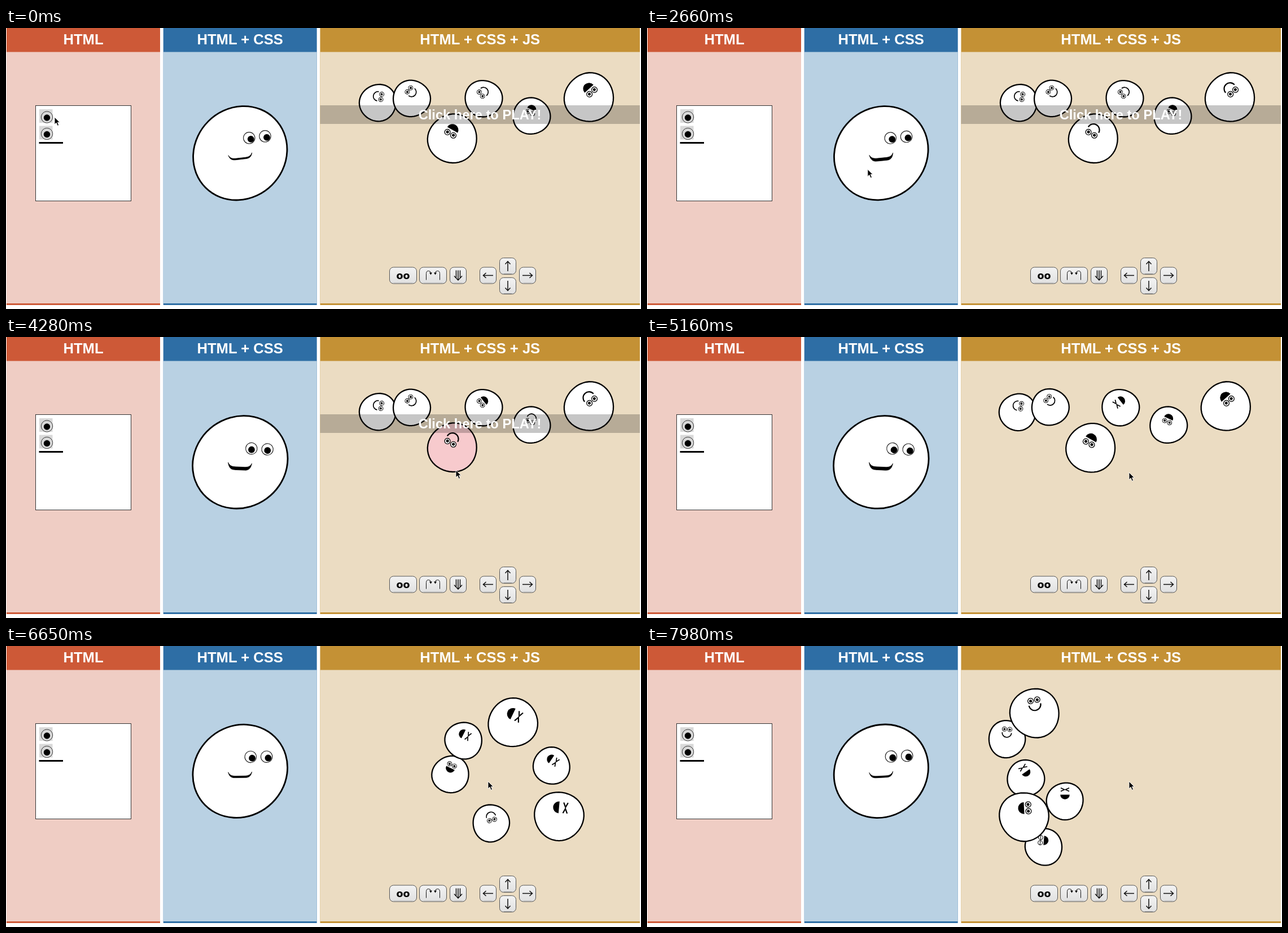
An HTML page that plays this animation: 1125x498 px, repeating every 8 s.

```html
<!DOCTYPE html>
<html lang="en">
<head>
<meta charset="utf-8">
<title>HTML, CSS and JS faces</title>
<style>
  html, body { margin: 0; width: 100%; height: 100%; overflow: hidden; background: #fff; }
  svg { display: block; width: 100%; height: 100%; }
  text { font-family: "Liberation Sans", Arial, sans-serif; font-weight: bold; text-anchor: middle; }
  .title { font-size: 25.6px; fill: #fff; }
  .label { font: bold 17.5px "DejaVu Sans", sans-serif; }
  .icon { fill: none; stroke: #111; stroke-width: 1.5; }
  .ball { stroke: #000; stroke-width: 2.3; }
  .line { fill: none; stroke: #000; stroke-width: 1.7; }
  .eye { fill: #fff; stroke: #000; stroke-width: 1; }
</style>
</head>
<body>
<svg viewBox="0 0 1125 498">
  <defs>
    <linearGradient id="keyFace" x2="0" y2="1">
      <stop stop-color="#f3f3f3"/><stop offset="1" stop-color="#e0e0e0"/>
    </linearGradient>
    <g id="plainEye">
      <rect x="-13.5" y="-14" width="23.5" height="24" fill="#d9d9d9"/>
      <circle r="10.2" fill="none" stroke="#333"/>
      <circle cy="1" r="5.7"/>
    </g>
    <path id="arrowPointer" d="M0 0V13L3 10L5.3 15.3L7.6 14.3L5.4 9.2H9.2Z" stroke="#fff" stroke-width=".9"/>
    <path id="textPointer" d="M-3-6.5Q0-6.5 0-4.5Q0-6.5 3-6.5M0-4.5V4.5M-3 6.5Q0 6.5 0 4.5Q0 6.5 3 6.5M-1.5 2H1.5"
      fill="none" stroke="#000" stroke-width="1.3"/>
  </defs>
  <g id="panels"></g>
  <rect x="52.5" y="137.5" width="169" height="169" fill="#fff" stroke="#333"/>
  <use href="#plainEye" x="72.5" y="158"/>
  <use href="#plainEye" x="72.5" y="187.5"/>
  <rect x="58.5" y="202" width="42.5" height="3"/>
  <g id="head"></g>
  <g id="balls"></g>
  <g id="overlay">
    <rect x="556.5" y="137" width="566.5" height="33" fill="#000" fill-opacity=".225"/>
    <text x="839.5" y="161.5" font-size="23.7" fill="#fff">Click here to PLAY!</text>
  </g>
  <g id="keys"></g>
  <use id="pointer"/>
</svg>
<script>
const STEP = 147.5, LOOP = 8000;
const PLAY_STEP = 31, SWEEP_STEP = 33;
const byId = id => document.getElementById(id);
const put = (id, markup) => { byId(id).innerHTML = markup; };

/* Static parts */
const panel = (x, width, dark, light, title) => `
  <rect x="${x}" width="${width}" height="491" fill="${dark}"/>
  <rect x="${x}" y="42.5" width="${width}" height="445.5" fill="${light}"/>
  <text class="title" x="${x + width / 2}" y="29.3">${title}</text>`;

put('panels',
  panel(1, 272, '#cd5937', '#efcdc4', 'HTML') +
  panel(278.7, 272, '#2e6ea5', '#b9d1e3', 'HTML + CSS') +
  panel(556.5, 566.5, '#c49135', '#ebdcc2', 'HTML + CSS + JS'));

const key = (x, y, width, content) => `
  <g transform="translate(${x} ${y})">
    <rect x="${-width / 2}" y="-14.5" width="${width}" height="29" rx="7" fill="url(#keyFace)" stroke="#555"/>
    <path d="M${7 - width / 2} 13.5H${width / 2 - 7}" stroke="#aaa"/>
    ${content}
  </g>`;
const arrow = turn =>
  `<path class="icon" transform="rotate(${turn})" d="M0 9V-8M-4.5-3.5L0-8.5L4.5-3.5"/>`;
const brow = flip => `<g transform="scale(${flip} 1)">
  <path class="icon" style="stroke-width:1" d="M-12 8V-3Q-12-8-8-8Q-4-8-4-4"/>
  <path d="M-6.5-5H-1.5L-4-1Z"/></g>`;

put('keys',
  key(703.5, 438.5, 48, '<text class="label" y="6.5">oo</text>') +
  key(756.5, 438.5, 48, brow(1) + brow(-1)) +
  key(801, 438.5, 29, '<path class="icon" d="M-3.5-9V4M0-9V8M3.5-9V4M-7 1L0 8.5L7 1"/>') +
  key(854, 438.5, 29, arrow(-90)) +
  key(889, 422, 29, arrow(0)) +
  key(889, 457, 29, arrow(180)) +
  key(924, 438.5, 29, arrow(90)));

/* Motion: key points of [step, ...values] */
const linear = p => p;
const smooth = p => p * p * (3 - 2 * p);

function track(points, step, ease = linear) {
  const i = points.findIndex(point => point[0] > step);
  if (i < 0) return points.at(-1).slice(1);
  const [start, ...from] = points[i - 1];
  const [end, ...to] = points[i];
  const p = ease((step - start) / (end - start));
  return from.map((value, k) => value + (to[k] - value) * p);
}

const pointerPath = [[0, 86, 158], [4, 43, 330], [10, 328, 3], [11, 327, 8],
  [19, 400, 285], [25, 764, 16], [29, 797, 236], [31, 854, 240]];

/* turn, mouth depth */
const headPath = [[0, 0, 9.5], [11, 2.5, 12], [25, -.5, 12], [29, 9, 12.5],
  [40, 9.5, 12.5], [50, 1.5, 7.8], [54, 3.5, 10]];

/* A sweep to the left stops at the wall, where balls pile up and squeeze apart. */
function sweepLeft([x, y, turn], index) {
  const wall = 620 + 22 * index;
  const squeeze = x - 130 < wall ? 12 * (-1) ** index : 0;
  return [Math.max(x - 130, wall), y + squeeze, turn];
}

/* Poses are x, y and face turn; the mouth opens and closes at the toggle steps. */
function makeBall(index, size, toggles, start, right, end) {
  const [x, y, turn] = right;
  return {
    index, size, toggles,
    path: [[0, ...start], [SWEEP_STEP, ...start], [40, ...sweepLeft(start, index)],
      [47, x + 17, y + 8, turn], [50, ...right], [54, ...end]]
  };
}

const balls = [
  makeBall(0, 1, [51], [659, 132.5, 100], [901.5, 348, 180], [703, 356, 275]),
  makeBall(1, 1, [9, 14, 44], [718.5, 125, -50], [806.5, 248, 45], [671, 234.5, -35]),
  makeBall(2, 1, [20], [846, 125, -128], [1011.5, 226, -263], [740.5, 275, -360]),
  makeBall(3, 1, [0, 27, 34, 51], [931, 156, 204], [796, 162.5, 95], [637.5, 165, 5]),
  makeBall(4, 1.33, [0, 8, 22, 27, 34, 46, 51], [791, 196, 209], [1030, 316.5, 67], [668, 302.5, 87]),
  makeBall(5, 1.33, [0, 6, 34, 51], [1033, 123, 138], [880, 131, 110], [687, 119, -12])
];

/* Drawing */
function blob(radius, phase) {
  const points = Array.from({ length: 48 }, (_, i) => {
    const a = i * Math.PI / 24;
    const r = radius * (1 + .012 * Math.cos(2 * a + phase) + .018 * Math.cos(3 * a - 2 * phase));
    return `${(r * Math.cos(a)).toFixed(2)} ${(r * Math.sin(a)).toFixed(2)}`;
  });
  return `M${points.join('L')}Z`;
}

function face(laughing, squinting, blinking) {
  const eye = x => `<circle class="eye" cx="${x}" cy="-6" r="3.9"/>` + (blinking
    ? `<path class="eye" d="M${x - 4}-6h8"/>`
    : `<circle cx="${x}" cy="-5.8" r="2"/>`);
  const eyes = squinting
    ? '<path class="line" d="M-7.5-12L-1-9L-7.5-6M7.5-12L1-9L7.5-6"/>'
    : eye(-4.7) + eye(4.7);
  const mouth = `<path class="${laughing ? '' : 'line'}" d="M-8.3 0A8.3 8.3 0 0 0 8.3 0"/>`;
  return eyes + mouth;
}

function drawBall({ index, size, toggles, path }, step) {
  const [x, y, turn] = track(path, step, step < 50 ? smooth : linear);
  const [px, py] = track(pointerPath, step);
  const hovered = step < PLAY_STEP && Math.hypot(px - x, py - y) < 32.6 * size;

  const past = toggles.filter(from => from <= step);
  const laughing = past.length % 2 === 1;
  const squinting = laughing && step > SWEEP_STEP && step - past.at(-1) > 3;
  const blinking = (step + 15 * index) % 31 === 23;

  return `<g transform="translate(${x} ${y})">
    <path class="ball" fill="${hovered ? '#f7cacd' : '#fff'}" d="${blob(32.6 * size, index + turn / 57)}"/>
    <g transform="translate(0 ${-11.5 * size}) rotate(${turn}) scale(${size > 1 ? 1.27 : 1})">
      ${face(laughing, squinting, blinking)}
    </g>
  </g>`;
}

function drawHead(step) {
  const [turn, depth] = track(headPath, step);
  const look = step >= 25 && step < PLAY_STEP ? .5 : 3;
  const eye = (x, y) => `<circle cx="${x}" cy="${y}" r="10.2" fill="#fff" stroke="#222" stroke-width="1.1"/>
    <circle cx="${x + look}" cy="${y + 2}" r="5.9"/>`;
  return `<g transform="translate(414.8 221.8) rotate(${turn})">
    <ellipse rx="86.5" ry="79.8" transform="rotate(-45)" fill="#fff" stroke="#000" stroke-width="2.8"/>
    ${eye(16, -27)}${eye(44.2, -30)}
    <path transform="translate(0 1.5) rotate(-6.5)" stroke="#000" stroke-width=".7"
      d="M-21 0C-18 6-14 7-7 7H7C14 7 18 6 21 0C19 ${depth} 12 ${depth} 8 ${depth}H-8C-12 ${depth}-19 ${depth}-21 0Z"/>
  </g>`;
}

function placePointer(step) {
  const [x, y] = track(pointerPath, step);
  const overTitle = y < 42 && x > 734 && x < 945;
  const pointer = byId('pointer');
  pointer.setAttribute('href', overTitle ? '#textPointer' : '#arrowPointer');
  pointer.setAttribute('transform', `translate(${x} ${y})`);
}

let shown = -1;
function render(now) {
  const step = Math.floor(now % LOOP / STEP);
  if (step !== shown) {
    shown = step;
    put('head', drawHead(step));
    put('balls', balls.map(ball => drawBall(ball, step)).join(''));
    placePointer(step);
    byId('overlay').style.display = step < PLAY_STEP ? '' : 'none';
  }
  requestAnimationFrame(render);
}
render(performance.now());
</script>
</body>
</html>
```
